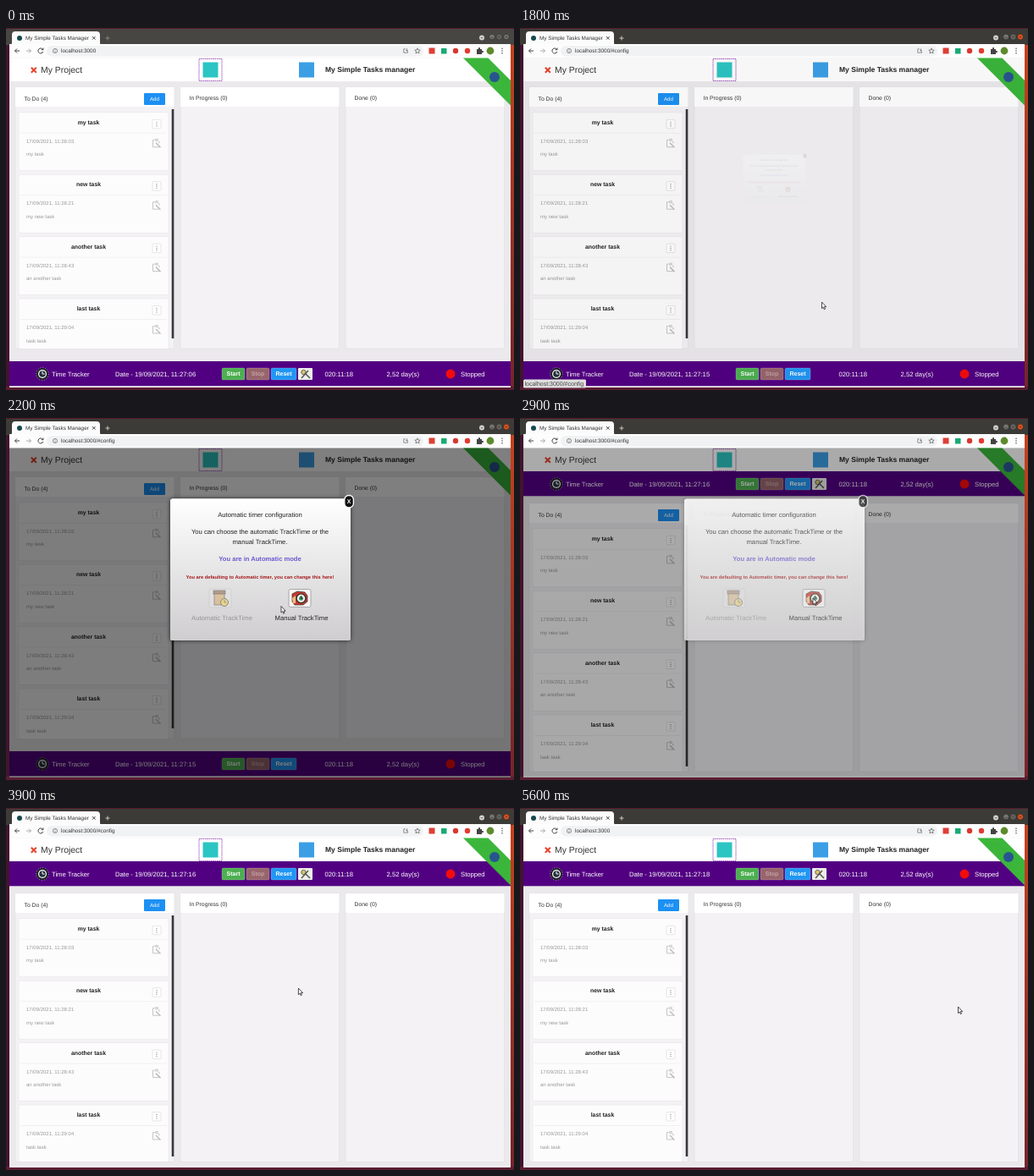
An HTML page that plays this animation: 600x428 px, repeating every 5.7 s.

```html
<!DOCTYPE html>
<html lang="en">
<head>
<meta charset="utf-8">
<title>Task board</title>
<style>
html, body { margin: 0; width: 100%; height: 100%; overflow: hidden; background: #3a1a2c; }
svg { display: block; width: 600px; height: 428px; }
text { font-family: "Liberation Sans", Arial, sans-serif; text-rendering: geometricPrecision; white-space: pre; }
</style>
</head>
<body>
<svg id="stage" viewBox="0 0 600 428" xmlns="http://www.w3.org/2000/svg"></svg>
<script>
const LOOP = 5700, STEP = 100;
const stage = document.getElementById('stage');

const rect = (x, y, w, h, fill, extra = '') =>
  `<rect x="${x}" y="${y}" width="${w}" height="${h}" fill="${fill}" ${extra}/>`;
const disc = (x, y, r, fill, extra = '') =>
  `<circle cx="${x}" cy="${y}" r="${r}" fill="${fill}" ${extra}/>`;
const line = (d, stroke, w = 1, extra = '') =>
  `<path d="${d}" fill="none" stroke="${stroke}" stroke-width="${w}" ${extra}/>`;
const text = (x, y, size, fill, str, extra = '') =>
  `<text x="${x}" y="${y}" font-size="${size}" fill="${fill}" ${extra}>${str}</text>`;
const MID = 'text-anchor="middle"', BOLD = 'font-weight="bold"', BOTH = MID + ' ' + BOLD;

function browser() {
  const dots = [24.2, 27, 29.8].map(y => disc(586, y, .8, '#555')).join('');
  const buttons = [574, 582.5, 591].map((x, i) =>
    disc(x, 10.5, 3.4, '#77756f', `${i == 2 ? 'id="close" ' : ''}stroke="#2c2b28" stroke-width=".7"`) +
    line(['M-1.3 1.2h2.6', 'M-1.2-1.2h2.4v2.4h-2.4z', 'M-1.2-1.2l2.4 2.4m0-2.4l-2.4 2.4'][i],
      '#33322e', .7, `transform="translate(${x} 10.5)"`)).join('');
  return rect(0, 0, 600, 20, '#43413d', 'id="strip"') + rect(0, 0, 600, 1, '#571a2c') +
    '<path d="M5 20Q7 20 7 17V8Q7 4 11 4H107Q111 4 111 8V17Q111 20 113 20Z" fill="#fbfbfb"/>' +
    disc(16, 12, 3, '#17494f', 'id="favicon"') +
    text(23, 14.3, 6.4, '#333', 'My Simple Tasks Manager') +
    line('M102 10l3.6 3.6m0-3.6l-3.6 3.6', '#333', .9) +
    line('M117.5 12h5m-2.5-2.5v5', '#b5b3ae', .9, 'id="plus"') +
    disc(562, 11.5, 3, '#d5d4d1') + line('M560.6 10.8l1.4 1.5 1.4-1.5', '#444', .8) + buttons +
    rect(4, 19, 592, 16.5, '#fdfdfd') + rect(48, 21, 445, 12.5, '#f1f2f3', 'rx="6.2"') +
    line('M16 27h-5.5m2.5-2.5l-2.5 2.5 2.5 2.5', '#444', 1) +
    line('M24 27h5.5m-2.5-2.5l2.5 2.5-2.5 2.5', '#aaa', 1) +
    line('M43.5 25.4a3 3 0 1 0 .3 2.5M44 23.5v2.2h-2.2', '#444', 1, 'id="reload"') +
    line('M38.5 24.5l5 5m0-5l-5 5', '#444', 1, 'id="cancel"') +
    disc(58, 27, 2.6, 'none', 'stroke="#666" stroke-width=".7"') + line('M58 25.3v.7m0 .7v2', '#666', .7) +
    text(65, 29.2, 6.4, '#333', '', 'id="url"') +
    line('M474.5 27.5v1.7h-4.7v-4.4h2m1.7-.5v3m-1.2-1.1l1.2 1.2 1.2-1.2', '#666', .7) +
    line('M486 23.9l.9 2.1 2.3.2-1.7 1.5.5 2.2-2-1.2-2 1.2.5-2.2-1.7-1.5 2.3-.2z', '#555', .7) +
    rect(499.5, 23.5, 7, 7, '#df3f35', 'id="ext"') + rect(514, 24, 6.5, 6.5, '#19a974') +
    disc(531, 27, 3.2, '#d9372f') + disc(545, 27, 3.2, '#e23a30') +
    '<path d="M556 25h2q-.5-2 1-2t1 2h2v2q2-.5 2 1t-2 1v2h-6z" fill="#444"/>' +
    disc(572, 27, 4.4, '#5d8a2c') + dots;
}

function header() {
  return rect(4, 35.5, 592, 27.5, '#fff') +
    line('M29.8 46.8l6 6m0-6l-6 6', '#e8432c', 2) +
    text(41, 53, 10.4, '#333', 'My Project') +
    rect(228, 36.5, 27, 26, 'none', 'stroke="#9a4bb8" stroke-width=".9" stroke-dasharray="1.6 .7"') +
    rect(232.5, 40.5, 18, 18, '#2bc5c3') + rect(346, 40.5, 18, 18, '#3c9fe6') +
    text(377, 52.3, 8.56, '#222', 'My Simple Tasks manager', BOLD);
}

const TASKS = [['my task', '28:03', 'my task'], ['new task', '28:21', 'my new task'],
  ['another task', '28:43', 'an another task'], ['last task', '29:04', 'task task']];

const card = ([title, time, note], i) => `<g transform="translate(15 ${99.8 + i * 73.4})">` +
  rect(0, 0, 177, 69, '#fdfcfd', 'stroke="#e9e7e9" stroke-width=".7"') +
  text(82.5, 14, 6.9, '#222', title, BOTH) + line('M2 24.5h173', '#efedef', .8) +
  rect(158, 8.5, 10, 10.5, '#fff', 'stroke="#dddbdd" stroke-width=".7" rx="1"') +
  [11.5, 13.8, 16.1].map(y => disc(163, y, .65, '#888')).join('') +
  text(9, 36.2, 6, '#999', `17/09/2021, 11:${time}`) + text(9, 51.7, 6, '#999', note) +
  line('M165 34.5h1v2m0 4.5h-7.5v-8.5h2.2m1-1h2.6v2h-2.6z', '#c6c4c7', 1) +
  line('M162 36l5.5 5.5', '#bebcbf', 1.5) + '</g>';

function board() {
  const columns = ['To Do (4)', 'In Progress (0)', 'Done (0)'].map((name, i) => {
    const x = 11 + i * 195;
    return `<rect class="column" x="${x}" y="70" width="187.5" fill="#f4f2f5" stroke="#e2e0e3" stroke-width=".7"/>` +
      rect(x, 70, 187.5, 23, '#fff') + text(x + 10.5, 86 - (i && 1.2), 6.8, '#333', name);
  }).join('');
  return columns + rect(163, 77, 25, 14, '#1c90f3', 'rx="1"') +
    text(175.5, 86.2, 6.2, '#fff', 'Add', MID) +
    `<g clip-path="url(#fold)">${TASKS.map(card).join('')}</g>` +
    rect(195.7, 96, 2.6, 271, '#38363a', 'id="scroll"');
}

function button(x, w, fill, label, ink = '#fff') {
  return rect(x, 402, w, 14, fill, 'rx="1.5" stroke="#ffffff55" stroke-width=".6"') +
    text(x + w / 2, 411.3, 7, ink, label, BOTH);
}

function tracker() {
  const octagon = [...Array(8)].map((_, i) => {
    const a = (i + .5) * Math.PI / 4;
    return `${525 + 5.6 * Math.cos(a)},${409 + 5.6 * Math.sin(a)}`;
  }).join(' ');
  return rect(4, 394, 592, 29.3, '#520082') +
    disc(43, 409, 7.4, '#22202c', 'stroke="#b9b0cc" stroke-width=".9" stroke-dasharray="1 1.9"') +
    disc(43, 409, 5, '#fff') + disc(43, 409, 3.8, '#26303c') +
    line('M43 406v3h2.5', '#fff', 1) +
    text(54, 411.6, 7.7, '#fff', 'Time Tracker') + text(129, 411.6, 7.7, '#fff', '', 'id="date"') +
    button(255, 27, '#4caf50', 'Start') + button(284, 27, '#97656b', 'Stop', '#c3a2a5') +
    button(313, 30, '#2196f3', 'Reset') +
    '<g id="config">' + rect(345, 402, 17, 14, '#eeeeea', 'rx="1"') +
    disc(351.5, 407, 2.7, '#d8c86a', 'stroke="#666" stroke-width="1"') +
    line('M349 414l8-9m-4 3l6 6', '#555', 1.5) + '</g>' +
    text(376.5, 411.6, 7.7, '#fff', '020:11:18') + text(449.5, 411.6, 7.7, '#fff', '2,52 day(s)') +
    `<polygon points="${octagon}" fill="#f50b0b"/>` + text(537, 411.6, 7.7, '#fff', 'Stopped');
}

const sheet = (fill, extra) => rect(194, 95.5, 213, 167.5, fill, 'rx="3" ' + extra);

function popup() {
  const say = (y, str, fill = '#222', size = 7.7, extra = MID) => text(300, y, size, fill, str, extra);
  return sheet('#000', 'id="shadow" filter="url(#blur)"') + sheet('#fff', 'id="backing"') +
    '<g id="content">' + sheet('url(#fade)', '') +
    say(116.7, 'Automatic timer configuration') +
    say(137, 'You can choose the automatic TrackTime or the') + say(149.2, 'manual TrackTime.') +
    say(168.5, 'You are in Automatic mode', '#6a5acd', 7.6, BOTH) +
    say(190, 'You are defaulting to Automatic timer, you can change this here!', '#a51a1a', 5.73, BOTH) +
    '<g opacity=".5">' + rect(240, 202, 26, 22, '#e6e4e4', 'rx="2" stroke="#bbb" stroke-width=".7"') +
    rect(245, 204, 14, 4, '#8a5a30', 'stroke="#333" stroke-width=".8"') +
    rect(246, 208, 12, 13, '#d9a860', 'stroke="#333" stroke-width=".8"') +
    disc(258, 218, 4.5, '#f5cf3c', 'stroke="#333" stroke-width="1"') + line('M258 215v3h2.5', '#333', .8) +
    text(255, 238.7, 7.7, '#555', 'Automatic TrackTime', MID) + '</g>' +
    rect(334, 202.5, 26, 21, '#f6f4f4', 'rx="2" stroke="#999" stroke-width=".8"') +
    '<path d="M338 208l6-3 9 1 3 4v7l-5 4h-10l-3-4z" fill="#c83a2c" stroke="#333" stroke-width=".7"/>' +
    '<path d="M338 213l4-3v9h-3z" fill="#efbd83"/>' +
    disc(348.5, 213.3, 5.4, '#f6f4e8', 'stroke="#333" stroke-width="1.4"') +
    disc(348.5, 213.3, 2.5, '#3b8f74') + line('M348.5 210v3.3h2', '#222', .8) +
    text(349, 238.7, 7.7, '#222', 'Manual TrackTime', MID) +
    rect(399.8, 91.5, 10.6, 14.5, '#111', 'rx="5" stroke="#fff" stroke-width="1.3"') +
    text(405.1, 101.3, 7, '#fff', 'X', BOTH) + '</g>';
}

stage.innerHTML = `<defs>
  <clipPath id="fold"><rect id="foldBox" x="11" y="94" width="184" height="285"/></clipPath>
  <linearGradient id="fade" x2="0" y2="1"><stop stop-color="#fff"/><stop offset="1" stop-color="#cfcdcf"/></linearGradient>
  <linearGradient id="edge" x2="0" y2="1"><stop stop-color="#c9431f"/><stop offset="1" stop-color="#74242b"/></linearGradient>
  <filter id="blur" x="-10%" y="-10%" width="120%" height="125%"><feGaussianBlur stdDeviation="2.5"/></filter>
  </defs>` +
  rect(0, 0, 4, 428, '#42152f') + rect(596, 0, 4, 428, 'url(#edge)') + rect(0, 424, 600, 4, '#5b1d31') +
  rect(4, 35, 592, 390, '#ebe9ec') + rect(4, 423, 592, 2, '#fafafa') + browser() + header() +
  `<g id="board">${board()}</g><g id="tracker">${tracker()}</g>
  <path d="M540 35.5H569.5L596 62V91.5Z" fill="#3bb63b"/>` + disc(577, 58, 6, '#28558f') +
  rect(4, 35.5, 592, 389.5, '#000', 'id="dim"') + `<g id="popup">${popup()}</g>` +
  '<g id="status">' + rect(4, 415.5, 74, 10, '#dedede', 'rx="1.5"') +
  text(5.5, 423, 7, '#444', 'localhost:3000/#config') + '</g>' +
  '<path id="cursor" d="M0 0V7.6L1.7 6.1 2.8 8.7 4 8.2 2.9 5.6H5.2Z" fill="#fff" stroke="#222" stroke-width=".8"/>';

const el = id => document.getElementById(id);
const set = (id, name, value) => el(id).setAttribute(name, value);
const show = (id, on) => set(id, 'visibility', on ? 'visible' : 'hidden');

// Each key is [time, ...values]
function tween(keys, t) {
  let i = 0;
  while (i < keys.length - 2 && t >= keys[i + 1][0]) i++;
  const [a, b] = [keys[i], keys[i + 1]];
  const k = Math.min(1, Math.max(0, (t - a[0]) / (b[0] - a[0])));
  return a.slice(1).map((v, j) => v + (b[j + 1] - v) * k);
}

const POINTER = [[300, 603, 230], [1300, 353, 407], [1700, 353, 407], [1800, 356.5, 324], [2000, 332, 252],
  [2200, 325, 222.5], [2500, 346, 213], [3200, 346, 213], [4600, 344.8, 213], [4900, 344.8, 213], [5600, 517.5, 235]];
// scale, popup opacity, dim opacity
const OPENING = [[1700, .1, 0, 0], [1800, .347, .12, .03], [1900, .85, .3, .1], [2000, 1, .48, .21],
  [2200, 1, 1, .5], [2800, 1, 1, .5], [3100, 1, 0, 0]];
const CLOCK = [[0, 6], [1800, 15], [2700, 15], [2800, 16], [4800, 16], [5000, 17], [5200, 18]];

function draw(t) {
  const [x, y] = tween(POINTER, t);
  const [scale, alpha, dim] = tween(OPENING, t);
  const onTop = t >= 2800, loading = t >= 4400 && t < 4800, focused = t >= 300;
  const hash = t >= 1700 && t < 4400;

  set('cursor', 'transform', `translate(${x} ${y})`);
  set('popup', 'transform', `translate(300 179) scale(${scale}) translate(-300 -179)`);
  set('content', 'opacity', alpha);
  set('backing', 'opacity', alpha);
  set('shadow', 'opacity', Math.max(0, 2 * alpha - 1) * .7);
  set('dim', 'opacity', dim);

  set('board', 'transform', `translate(0 ${onTop ? 31 : 0})`);
  set('tracker', 'transform', `translate(0 ${onTop ? -331 : 0})`);
  document.querySelectorAll('.column').forEach(c => c.setAttribute('height', onTop ? 317.5 : 309));
  set('foldBox', 'height', onTop ? 293 : 285);
  set('scroll', 'height', onTop ? 285 : 271);

  el('url').textContent = 'localhost:3000' + (hash ? '/#config' : '');
  el('date').textContent = 'Date - 19/09/2021, 11:27:' + String(Math.floor(tween(CLOCK, t)[0])).padStart(2, '0');
  show('config', t < 1700 || onTop);
  show('status', t >= 1300 && t < 2100);
  show('reload', !loading);
  show('cancel', loading);
  set('favicon', 'fill', loading ? '#555' : '#17494f');
  set('ext', 'fill', loading ? '#d5d5d5' : '#df3f35');
  set('close', 'fill', focused ? '#e95420' : '#77756f');
  set('plus', 'stroke', focused ? '#d5d3ce' : '#8d8b86');
  set('strip', 'fill', focused ? '#3d3b37' : '#484642');
}

function tick(now) {
  draw(Math.floor(now % LOOP / STEP) * STEP);
  requestAnimationFrame(tick);
}
draw(0);
requestAnimationFrame(tick);
</script>
</body>
</html>
```
